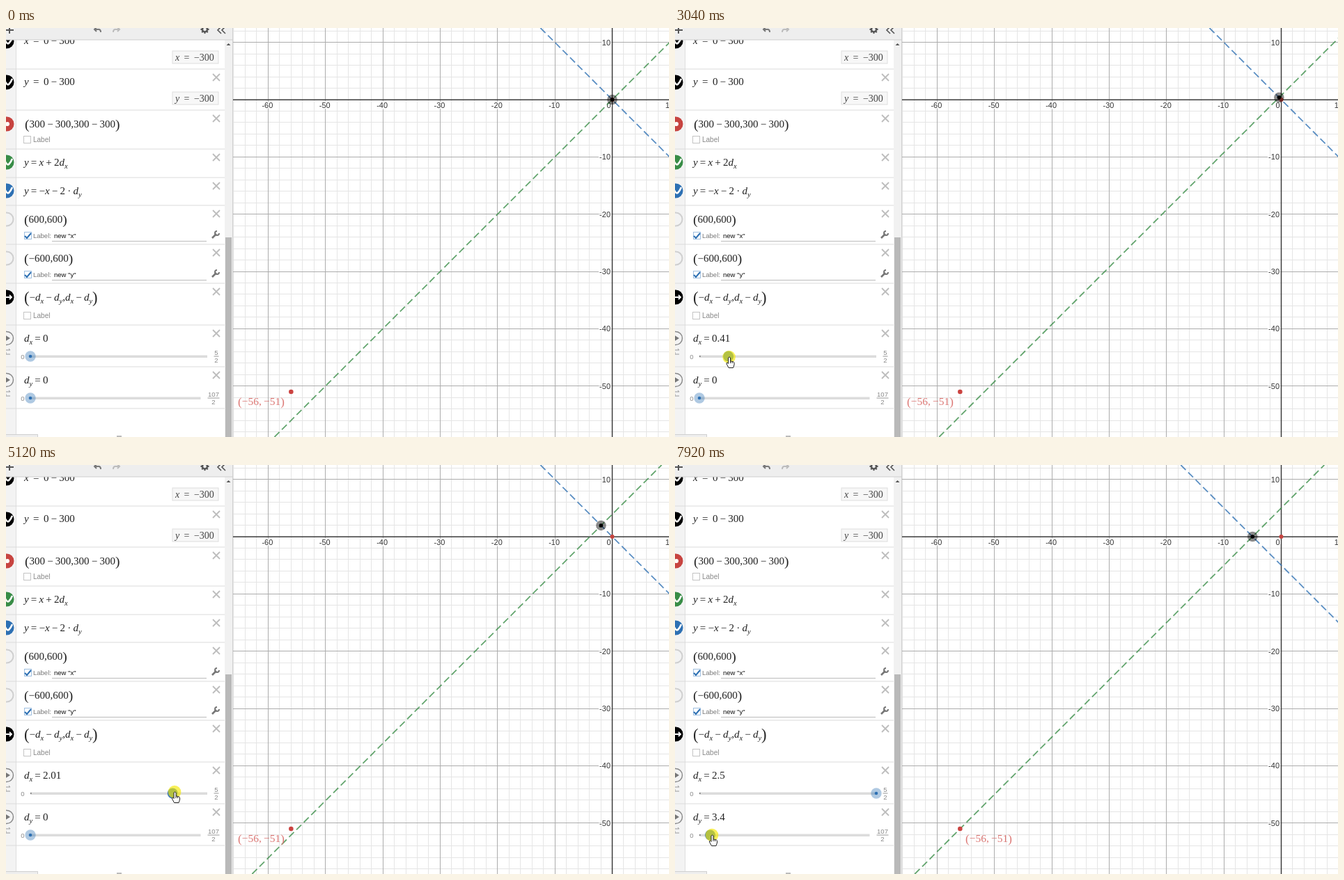
An HTML page with a canvas for the animation above (8 s loop, 952 px wide and 588 px high).

```html
<!DOCTYPE html>
<html lang="en">
<head>
<meta charset="utf-8">
<title>Sliders and lines</title>
<style>
html, body { margin: 0; width: 100%; height: 100%; overflow: hidden; background: #fff; }
canvas { display: block; width: 952px; height: 588px; }
</style>
</head>
<body>
<canvas id="stage" width="952" height="588"></canvas>
<script>
const W = 952, H = 588, LOOP = 8000;
const ctx = document.getElementById('stage').getContext('2d');
const SERIF = '"Liberation Serif", serif', SANS = '"Liberation Sans", sans-serif';
const RED = '#c74440', GREEN = '#388c46', BLUE = '#2d70b3', LINE = '#dcdcdc';
const UNIT = 8.235, OX = 870.5, OY = 103, LAG = 70;

// Keys are [time, value...].
const dxKeys = [[1960, 0], [2160, .03], [2800, .3], [3040, .41], [3640, .8], [4280, 1.26],
  [5120, 2.01], [5360, 2.17], [6000, 2.5]];
const dyKeys = [[7600, 0], [7680, .4], [7760, 1.2], [7840, 2.4], [7920, 3.4]];
const cursorRuns = [
  [80, 240, [[80, 762, 559], [160, 327, 478]]],
  [520, 6280, [[520, 46, 452], [900, 24, 500], [1320, 33, 534], [1760, 35.5, 476],
    [2000, 36, 476], [2160, 39, 479], [2800, 67, 475], [3040, 77.5, 473], [3640, 117, 468],
    [4280, 163.5, 466], [5120, 242, 470], [5360, 258, 472], [6200, 300, 476]]],
  [6920, LOOP, [[6920, 200, 502], [7120, 40, 546], [7280, 34, 534], [7360, 36, 532],
    [7620, 36, 532], [7920, 53, 532]]]
];

function at(keys, t) {
  if (t <= keys[0][0]) return keys[0].slice(1);
  for (let i = 1; i < keys.length; i++) {
    const a = keys[i - 1], b = keys[i];
    if (t <= b[0]) {
      const k = (t - a[0]) / (b[0] - a[0]);
      return a.slice(1).map((v, j) => v + (b[j + 1] - v) * k);
    }
  }
  return keys[keys.length - 1].slice(1);
}
const dxAt = t => Math.round(at(dxKeys, t)[0] * 100) / 100;
const dyAt = t => Math.round(at(dyKeys, t)[0] * 10) / 10;

function rect(x, y, w, h, color) {
  ctx.fillStyle = color;
  ctx.fillRect(x, y, w, h);
}
function disc(x, y, r, color) {
  ctx.fillStyle = color;
  ctx.beginPath();
  ctx.arc(x, y, r, 0, Math.PI * 2);
  ctx.fill();
}
function ring(x, y, r, color, width) {
  ctx.strokeStyle = color;
  ctx.lineWidth = width;
  ctx.beginPath();
  ctx.arc(x, y, r, 0, Math.PI * 2);
  ctx.stroke();
}
function stroke(d, color, width, x = 0, y = 0) {
  ctx.save();
  ctx.translate(x, y);
  ctx.strokeStyle = color;
  ctx.lineWidth = width;
  ctx.stroke(new Path2D(d));
  ctx.restore();
}
function text(s, x, y, font, color, align = 'left') {
  ctx.font = font;
  ctx.fillStyle = color;
  ctx.textAlign = align;
  ctx.fillText(s, x, y);
}

// Letters are italic, "_" lowers the next letter, a space is thin, brackets are tall.
function math(s, x, y, size = 15, color = '#222', tall = 1.3) {
  let low = false;
  for (const c of s) {
    if (c === ' ') { x += 3.2; continue; }
    if (c === '_') { low = true; continue; }
    const bracket = c === '(' || c === ')';
    const px = low ? size * .7 : bracket ? size * tall : size;
    text(c, x, y + (low ? 4 : bracket ? size * (tall - 1) * .4 : 0),
      (/[a-z]/.test(c) ? 'italic ' : '') + px + 'px ' + SERIF, color);
    x += ctx.measureText(c).width;
    low = false;
  }
}

function valueBox(s, y) {
  rect(238.5, y, 67, 19, '#dedede');
  rect(239.5, y + 1, 65, 17, '#f7f7f7');
  math(s, 243, y + 14, 14, '#444');
}
function emptyLabel(y) {
  ctx.strokeStyle = '#c4c4c4';
  ctx.lineWidth = 1;
  ctx.strokeRect(25.5, y - 4.5, 10, 10);
  text('Label', 39, y + 4, '10px ' + SANS, '#888');
}
function filledLabel(s, y) {
  ctx.strokeStyle = '#9fbfe0';
  ctx.lineWidth = 1;
  ctx.strokeRect(26.5, y - 4.5, 10, 10);
  stroke('M2 5L5 8L11 1', BLUE, 2, 25, y - 4);
  text('Label:', 39, y + 4, '9.5px ' + SANS, '#777');
  text(s, 69, y + 4, '9.5px ' + SANS, '#111');
  rect(66, y + 8, 222, 1, '#bbb');
  stroke('M-5 5L1 -1', '#777', 2.6, 301, y - 1);
  stroke('M5 -2A3 3 0 1 1 2 -5', '#777', 2, 301, y - 1);
}

function chip(y, color) {
  disc(1, y, 10.5, color);
  stroke('M-3 -5Q1 5 4 3Q7 0 9 -5', '#fff', 2.6, 0, y);
}
function playButton(y) {
  ring(1, y, 9.5, '#888', 1.4);
  ctx.fillStyle = '#777';
  ctx.fill(new Path2D(`M-2 ${y - 5}L6 ${y}L-2 ${y + 5}Z`));
  stroke('M0 -3H6M4 -5L6 -3M6 3H0M0 3V0', '#999', 1, 0, y + 20);
}

function slider(y, end, share, top, topX, held) {
  const font = '9.5px ' + SANS;
  text('0', 24, y + 4, font, '#888', 'center');
  rect(35, y - 1.5, end - 35, 3.5, '#dcdcdc');
  rect(35, y - 1, 1.5, 2, '#777');
  text(top, topX, y - 2, font, '#888', 'center');
  text('2', topX, y + 9, font, '#888', 'center');
  rect(topX - (top.length * 2.5 + 1), y - .5, top.length * 5 + 2, 1, '#999');
  const x = 35 + (end - 35) * share;
  if (held) return disc(x, y, 7.5, '#3d78ba');
  disc(x, y, 7.7, 'rgba(45,112,179,.38)');
  disc(x, y, 2.3, BLUE);
}

function panel(t) {
  rect(0, 0, 314, H, '#fff');
  rect(0, 0, 14, H, '#f3f3f3');
  rect(14, 0, 1, H, '#dedede');
  for (const y of [59, 118, 174, 215, 255, 311, 367, 427, 487, 547]) rect(0, y - .5, 314, 1, LINE);

  math('x  =  0 − 300', 26, 23);
  valueBox('x  =  −300', 32.5);
  math('y  =  0 − 300', 26, 82);
  valueBox('y  =  −300', 91.5);
  math('(300 − 300,300 − 300)', 27, 143);
  emptyLabel(160);
  math('y = x + 2d_x', 26, 198);
  math('y = −x − 2 · d_y', 26, 239);
  math('(600,600)', 26, 280);
  filledLabel('new "x"', 298);
  math('(−600,600)', 26, 336);
  filledLabel('new "y"', 354);
  math('(−d_x − d_y,d_x − d_y)', 26, 392, 15, '#222', 1.5);
  emptyLabel(413);

  const dx = dxAt(t), dy = dyAt(t);
  math('d_x = ' + dx, 26, 451);
  math('d_y = ' + dy, 26, 511);
  slider(472, 289, dx / 2.5, '5', 302, t >= 1760 && t < 6160);
  slider(532, 279.5, dy / 53.5, '107', 298, t >= 7520);

  for (const y of [71, 130, 186, 227, 267, 323, 379, 439, 499])
    stroke('M-5 -5L5 5M5 -5L-5 5', '#bdbdbd', 1.8, 302, y);

  chip(19, '#000');
  chip(78, '#000');
  disc(1, 138, 10.5, RED);
  disc(2, 138, 3, '#fff');
  chip(193, GREEN);
  chip(234, BLUE);
  ring(1, 275, 9.5, '#cfcfcf', 2);
  ring(1, 331, 9.5, '#cfcfcf', 2);
  disc(1, 387, 10.5, '#000');
  stroke('M0 0H8M5 -3L8 0L5 3', '#fff', 1.8, 0, 387);
  playButton(446);
  playButton(506);

  rect(0, 584, 46, 4, '#cfcfcf');
  rect(0, 585, 45, 3, '#eee');
  rect(159, 586, 7, 2, '#bbb');

  rect(314, 17, 12, H, '#f1f1f1');
  rect(315, 301, 9, H, '#b9b9b9');
  rect(325, 0, 1, H, '#d0d0d0');
  ctx.fillStyle = '#555';
  ctx.fill(new Path2D('M316.5 25L319.5 22L322.5 25Z'));
  toolbar();
}

function toolbar() {
  rect(0, 0, 325, 17, '#eeeeee');
  rect(0, 16.5, 325, 1, '#cfcfcf');
  stroke('M-1 3H11M5 -3V8', '#555', 2);
  stroke('M128 2H133Q136 2 136 6M130 -1L127 2L130 5', '#777', 2);
  stroke('M162 2H157Q154 2 154 6M160 -1L163 2L160 5', '#bbb', 2);
  ring(285.5, 2, 3.5, '#555', 2.4);
  for (let i = 0; i < 8; i++) {
    const a = i * Math.PI / 4;
    disc(285.5 + 5 * Math.cos(a), 2 + 5 * Math.sin(a), 1.2, '#555');
  }
  stroke('M309 -2L304 3L309 8M315 -2L310 3L315 8', '#555', 1.6);
}

function gridLabel(s, x, y, align) {
  ctx.strokeStyle = '#fff';
  ctx.lineWidth = 3;
  ctx.font = '11px ' + SANS;
  ctx.textAlign = align;
  ctx.strokeText(s, x, y);
  text(s, x, y, ctx.font, '#333', align);
}

function dashed(x1, y1, x2, y2, color) {
  ctx.save();
  ctx.globalAlpha = .78;
  ctx.setLineDash([10, 5]);
  ctx.strokeStyle = color;
  ctx.lineWidth = 1.8;
  ctx.beginPath();
  ctx.moveTo(x1, y1);
  ctx.lineTo(x2, y2);
  ctx.stroke();
  ctx.restore();
}

function graph(t) {
  const px = x => OX + x * UNIT, py = y => OY - y * UNIT;
  const gridLine = (v, vertical, color) => {
    const p = Math.round(vertical ? px(v) - .5 : py(v) - .5);
    vertical ? rect(p, 0, 1, H, color) : rect(326, p, W, 1, color);
  };
  rect(326, 0, W - 326, H, '#fff');
  for (const major of [false, true])
    for (let v = -66; v <= 12; v += 2)
      if ((v % 10 === 0) === major) {
        const color = major ? '#acacac' : '#e5e5e5';
        gridLine(v, true, color);
        gridLine(v, false, color);
      }
  rect(326, OY - .5, W, 1.4, '#333');
  rect(OX - .7, 0, 1.4, H, '#333');

  for (let v = -60; v <= 10; v += 10) {
    if (v) gridLabel(String(v), px(v) - (v < 0 ? 1 : 0), 115, 'center');
    if (v) gridLabel(String(v), 868, py(v) + 4, 'right');
  }
  gridLabel('0', 865.5, 115, 'center');

  const dx = dxAt(t - LAG), dy = dyAt(t - LAG);
  const low = (H - OY) / -UNIT, high = OY / UNIT;
  dashed(px(low - 2 * dx), H, px(high - 2 * dx), 0, GREEN);
  dashed(px(-high - 2 * dy), 0, px(-low - 2 * dy), H, BLUE);

  disc(px(0), py(0), 3, RED);
  disc(px(-56), py(-51), 3.3, '#cb4340');
  math('(−56, −51)', t < 6880 ? 333 : 417, 542, 15.5, '#dc7774', 1.1);

  const mx = px(-dx - dy), my = py(dx - dy);
  disc(mx, my, 7.3, 'rgba(0,0,0,.45)');
  disc(mx, my, 2.8, '#000');
}

const hand = new Path2D('M-1.5 1Q0 -1 1.5 1V6L5 6.5Q7 7 7 9V11L5.5 15.5H-1L-4 10Q-4.5 8 -3 8L-1.5 9.5Z');
function cursor(t) {
  const run = cursorRuns.find(([from, to]) => t >= from && t < to);
  if (!run) return;
  const [x, y] = at(run[2], t);
  disc(x, y, 9.3, 'rgba(245,232,0,.65)');
  ctx.save();
  ctx.translate(x + .5, y);
  ctx.fillStyle = '#fff';
  ctx.fill(hand);
  ctx.strokeStyle = '#222';
  ctx.lineWidth = 1;
  ctx.stroke(hand);
  ctx.beginPath();
  ctx.moveTo(1.5, 6); ctx.lineTo(1.5, 9);
  ctx.moveTo(4, 6.5); ctx.lineTo(4, 9);
  ctx.stroke();
  ctx.restore();
}

const start = performance.now();
function frame() {
  const t = (performance.now() - start) % LOOP;
  graph(t);
  panel(t);
  cursor(t);
  requestAnimationFrame(frame);
}
frame();
</script>
</body>
</html>
```
